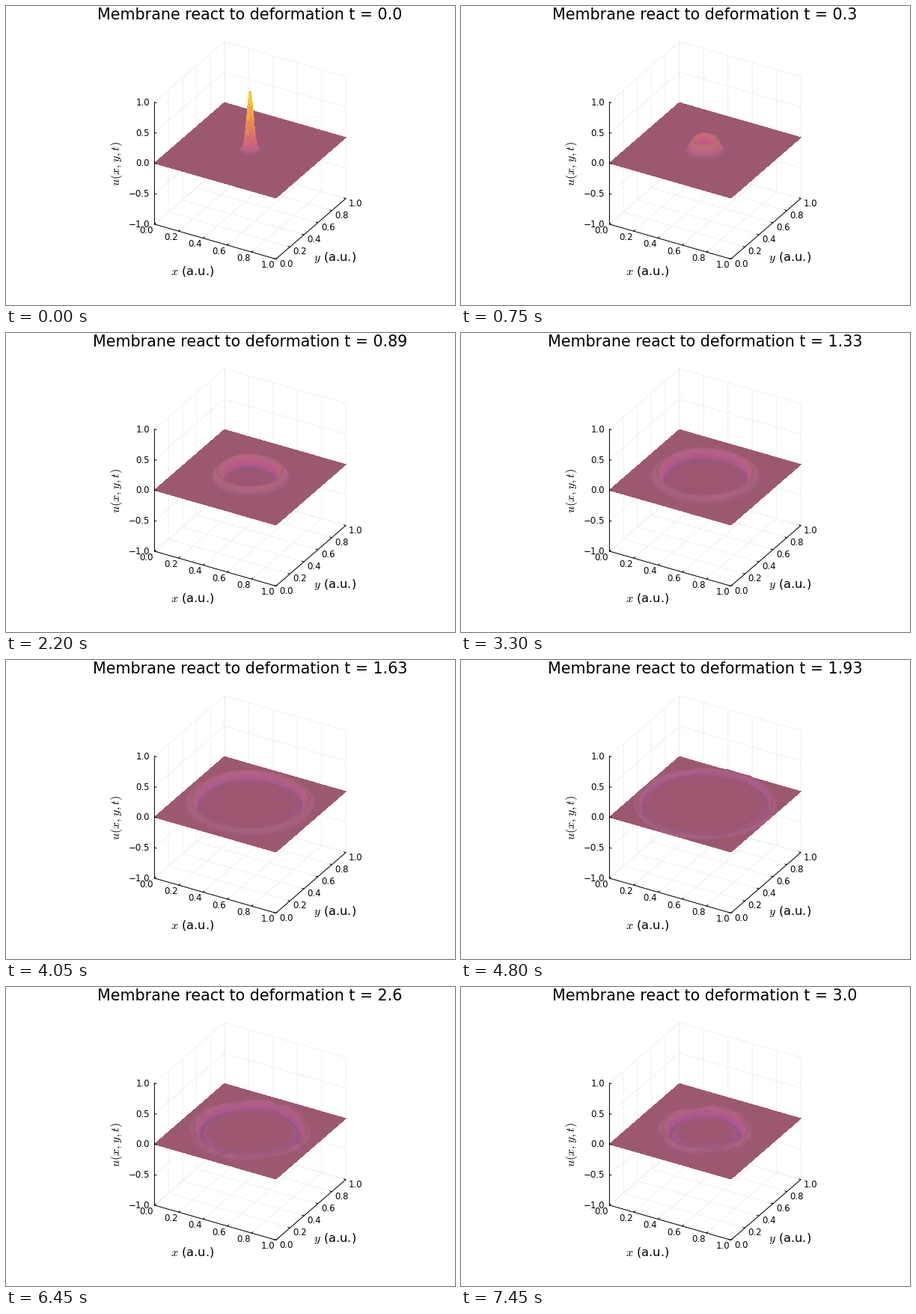
Animation, 600 px wide and 400 px high, one loop 7.5 s. Source, as a matplotlib script:

```python
import numpy as np
import matplotlib as mpl
import matplotlib.pyplot as plt
from matplotlib.animation import FuncAnimation

mpl.rcParams["font.family"] = "DejaVu Sans"
mpl.rcParams["mathtext.fontset"] = "cm"

W, H, DPI = 600, 400, 100
FRAMES, T_END = 150, 3.0
N, C = 100, 0.25
PX = 72 / DPI  # one pixel in points
TICK, GUIDE, TITLE = 8.5, 11.7, 14.86  # font sizes


def project(x, y, z):
    """Data coordinates to stage pixels, y pointing down."""
    return 198.4 + 162.3 * x + 93.4 * y, 210.3 + 46.6 * x - 81 * y - 81.6 * z


# Wave equation on a disc clamped at its rim
xs = np.linspace(0, 1, N)
gx, gy = np.meshgrid(xs, xs[::-1])  # rows run back to front
r2 = (gx - 0.5) ** 2 + (gy - 0.5) ** 2
inside = r2 < 0.25
step = T_END / (FRAMES - 1)
courant2 = (C * step * (N - 1)) ** 2


def laplacian(u):
    out = np.zeros_like(u)
    out[1:-1, 1:-1] = (u[2:, 1:-1] + u[:-2, 1:-1] + u[1:-1, 2:]
                       + u[1:-1, :-2] - 4 * u[1:-1, 1:-1])
    return out


def solve():
    u0 = np.exp(-1000 * r2) * inside
    u1 = (u0 + 0.5 * courant2 * laplacian(u0)) * inside
    states = [u0, u1]
    while len(states) < FRAMES:
        a, b = states[-2:]
        states.append((2 * b - a + courant2 * laplacian(b)) * inside)
    return states


states = solve()
cmap = mpl.colormaps["plasma"]
SHEEN = np.array([0, 10, 18]) / 255


def shade(u):
    """Cell colours: height through the colormap, richer on steep slopes."""
    mean = (u[1:, 1:] + u[1:, :-1] + u[:-1, 1:] + u[:-1, :-1]) / 4
    dx = (u[1:, 1:] + u[:-1, 1:] - u[1:, :-1] - u[:-1, :-1]) / 2
    dy = (u[:-1, 1:] + u[:-1, :-1] - u[1:, 1:] - u[1:, :-1]) / 2
    slope2 = (dx ** 2 + dy ** 2) * (0.503 * (N - 1)) ** 2
    up = (1 / np.sqrt(1 + slope2))[..., None]
    base = cmap((mean + 1) / 2)[..., :3]
    tint = base * (0.526 + 0.42 * (1 - up) ** 1.5)
    haze = np.sqrt(up) * 50 / 255 + 4 * up * (1 - up) * SHEEN
    return np.clip(tint + haze, 0, 1)


fig = plt.figure(figsize=(W / DPI, H / DPI), dpi=DPI, facecolor="white")
ax = fig.add_axes([0, 0, 1, 1])
ax.set_xlim(0, W)
ax.set_ylim(H, 0)
ax.axis("off")


def line(a, b, color="black", z=5):
    (x0, y0), (x1, y1) = project(*a), project(*b)
    ax.plot([x0, x1], [y0, y1], color=color, lw=PX, zorder=z,
            solid_capstyle="butt", snap=False)


def tick(p, dx, dy):
    x, y = project(*p)
    ax.plot([x, x + dx], [y, y + dy], color="black", lw=PX, zorder=5)


def label(x, y, s, size=TICK, ha="center", **kw):
    return ax.text(x, y, s, fontsize=size, ha=ha,
                   va=kw.pop("va", "baseline"), zorder=6, **kw)


# Grid on the floor and the two back walls
GRID = "#f0f0f0"
for v in np.linspace(0, 1, 6):
    line((v, 0, -1), (v, 1, -1), GRID, z=1)
    line((v, 1, -1), (v, 1, 1), GRID, z=1)
    line((0, v, -1), (1, v, -1), GRID, z=1)
    line((0, v, -1), (0, v, 1), GRID, z=1)
for v in np.linspace(-1, 1, 5):
    line((0, 0, v), (0, 1, v), GRID, z=1)
    line((0, 1, v), (1, 1, v), GRID, z=1)

# Axes, ticks and labels
line((0, 0, -1), (0, 0, 1))
line((0, 0, -1), (1, 0, -1))
line((1, 0, -1), (1, 1, -1))
for i, v in enumerate(np.linspace(0, 1, 6)):
    tick((v, 0, -1), 1.6, -1.4)
    tick((1, v, -1), -2.4, -0.7)
    label(187.8 + 32.4 * i, 303.6 + 9.3 * i, f"{v:.1f}")
    label(374.3 + 18.6 * i, 348.6 - 16.2 * i, f"{v:.1f}")
for v in np.linspace(-1, 1, 5):
    tick((0, 0, v), 2.4, 0.7)
    label(192, 214.5 - 81.6 * v, f"{v:.1f}".replace("-", "\u2212"), ha="right")

label(249, 360, "$x$ (a.u.)", GUIDE)
label(439, 341.5, "$y$ (a.u.)", GUIDE)
label(147.5, 211, "$u(x,y,t)$", GUIDE, va="center", rotation=90)
title = label(326, 18, "", TITLE)


def draw(i):
    for old in list(ax.collections):
        old.remove()
    u = states[i]
    px, py = project(gx, gy, u)
    mesh = ax.pcolormesh(px, py, shade(u), shading="flat", antialiased=False,
                         edgecolors="none", snap=False, zorder=3)
    title.set_text(f"Membrane react to deformation t = {round(i * step, 2)}")
    return mesh, title


anim = FuncAnimation(fig, draw, frames=FRAMES, interval=50, repeat=True,
                     repeat_delay=0, blit=False)
plt.show()
```
